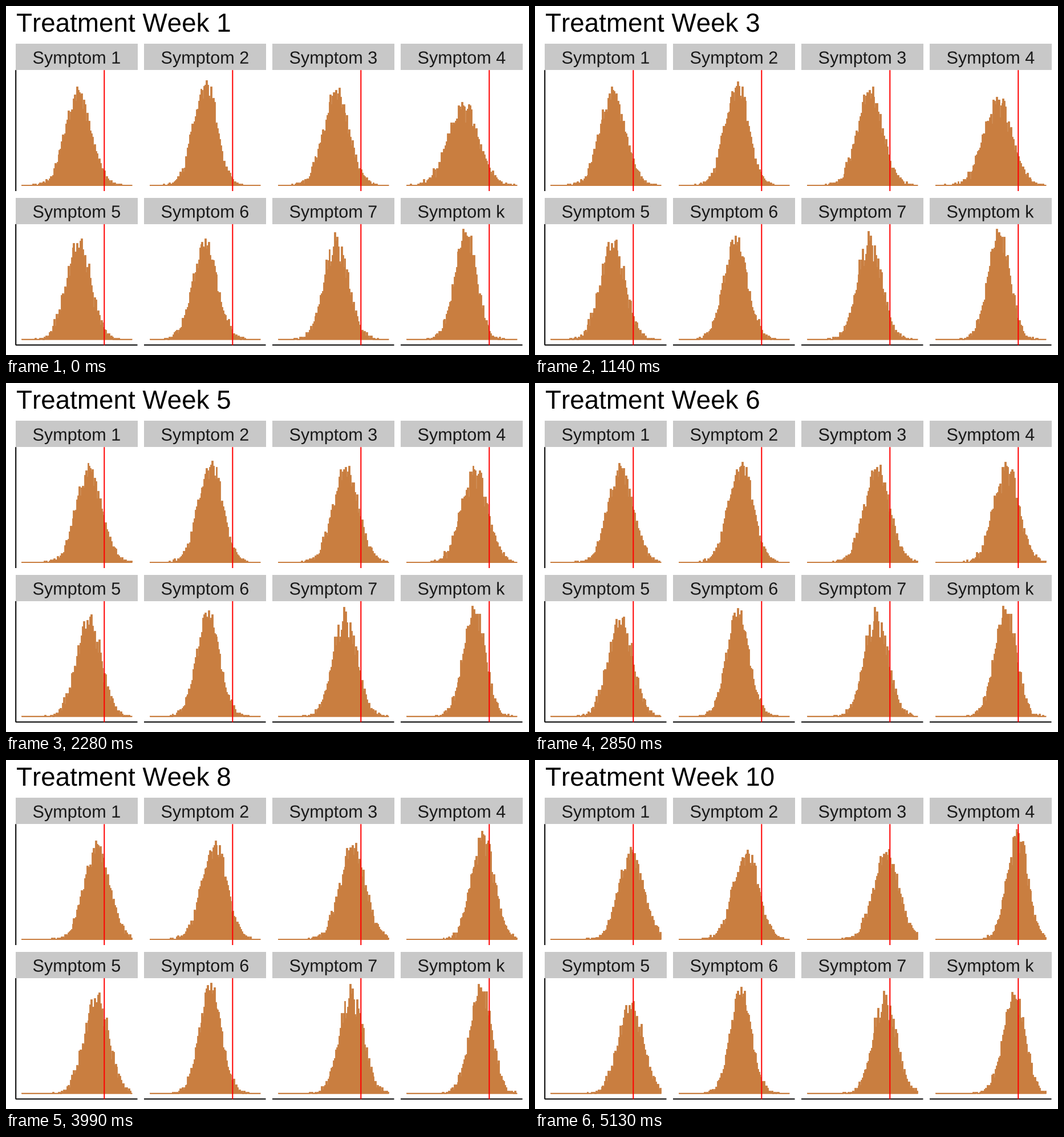
A matplotlib script that plays this animation: 917 by 611 pixels, repeating every 5700 ms.

```python
import numpy as np
import matplotlib.pyplot as plt
from matplotlib.animation import FuncAnimation
from matplotlib.patches import PathPatch, Rectangle
from matplotlib.textpath import TextPath
from matplotlib.transforms import Affine2D

W, H, DPI = 917, 611, 100
PX = 72 / DPI
WEEKS = 10
STEP_MS = 570
BAR, STRIP, INK = "#c97e40", "#c8c8c8", "#1a1a1a"
STEP_X, STEP_Y = 225, 269.7
BASE = 314      # zero line of the bars
FULL = 192.5    # height of the tallest bar in any week
AREA = 4150     # peak height times half-width
COUNT = 1.9     # height of one observation
BINS = 100
EDGES = np.linspace(28, 220.5, BINS + 1)
MIDS = (EDGES[:-1] + EDGES[1:]) / 2

# label, first centre, drift per week, half-width in the first and last week
SYMPTOMS = [
    ("1", 126.5, 4.7, 26.5, 26),
    ("2", 124, 2.3, 24, 26),
    ("3", 129, 4.1, 27, 27),
    ("4", 127, 4.9, 31, 21),
    ("5", 127, 4.5, 25.5, 25.5),
    ("6", 124.5, 1.3, 25.5, 22),
    ("7", 129.5, 3.8, 25, 24),
    ("k", 131, 3.8, 22.5, 22.5),
]
NOISE = np.random.default_rng(11).normal(0, 0.85, (len(SYMPTOMS), BINS))


def heights(k, i):
    """Bell of constant area whose rough outline travels with its centre."""
    _, start, drift, first, last = SYMPTOMS[k]
    center = start + drift * i
    half = first + (last - first) * i / (WEEKS - 1)
    peak = AREA / half
    curve = peak * np.exp(-np.log(2) * ((MIDS - center) / half) ** 2)
    shift = round(drift * i / (EDGES[1] - EDGES[0]))
    bars = curve + np.roll(NOISE[k], shift) * np.sqrt(curve)
    return np.round(np.clip(bars, 0, 1.12 * peak) / COUNT) * COUNT


def text_path(x, y, text, size):
    flip = Affine2D().scale(1, -1).translate(x, y)
    return flip.transform_path(TextPath((0, 0), text, size=size))


def add_text(x, y, text, size, color):
    return ax.add_patch(PathPatch(text_path(x, y, text, size), fc=color, lw=0))


def line(x0, y0, x1, y1, color, z=3):
    ax.plot([x0, x1], [y0, y1], color=color, lw=2 * PX, zorder=z,
            solid_capstyle="butt", snap=False)


def draw_panel(k):
    row, col = divmod(k, 4)
    dx, dy = col * STEP_X, row * STEP_Y
    ax.add_patch(Rectangle((17 + dx, 66 + dy), 213.5, 46.2, color=STRIP, lw=0))
    add_text(46.5 + dx, 100.8 + dy, "Symptom " + SYMPTOMS[k][0], 30.6, INK)
    hist = ax.stairs(np.full(BINS, BASE + dy), EDGES + dx, baseline=BASE + dy,
                     fill=True, fc=BAR, ec=BAR, lw=1.8 * PX, zorder=2)
    line(27 + dx, BASE + dy, 221.5 + dx, BASE + dy, BAR)
    if col == 0:
        line(17.2, 112.2 + dy, 17.2, 324 + dy, "black")
    if row == 1:
        line(17 + dx, 593.5, 230.5 + dx, 593.5, "black")
    line(172.3 + dx, 112.2 + dy, 172.3 + dx, 324 + dy, "red", z=4)
    return hist


plt.rcParams.update({
    "font.family": "Liberation Sans",
    "text.kerning_factor": 6,
    "toolbar": "None",
})
fig = plt.figure(figsize=(W / DPI, H / DPI), dpi=DPI, facecolor="white")
ax = fig.add_axes([0, 0, 1, 1])
title = add_text(18, 45, "Treatment", 45.8, "black")
hists = [draw_panel(k) for k in range(len(SYMPTOMS))]
ax.set_xlim(0, W)
ax.set_ylim(H, 0)
ax.axis("off")


def update(i):
    title.set_path(text_path(18, 45, f"Treatment Week {i + 1}", 45.8))
    bars = [heights(k, i) for k in range(len(SYMPTOMS))]
    scale = FULL / np.max(bars)
    for k, hist in enumerate(hists):
        hist.set_data(values=BASE + k // 4 * STEP_Y - bars[k] * scale)
    return [title, *hists]


anim = FuncAnimation(fig, update, frames=WEEKS, interval=STEP_MS,
                     init_func=lambda: update(0), repeat=True, blit=False)
plt.show()
```
